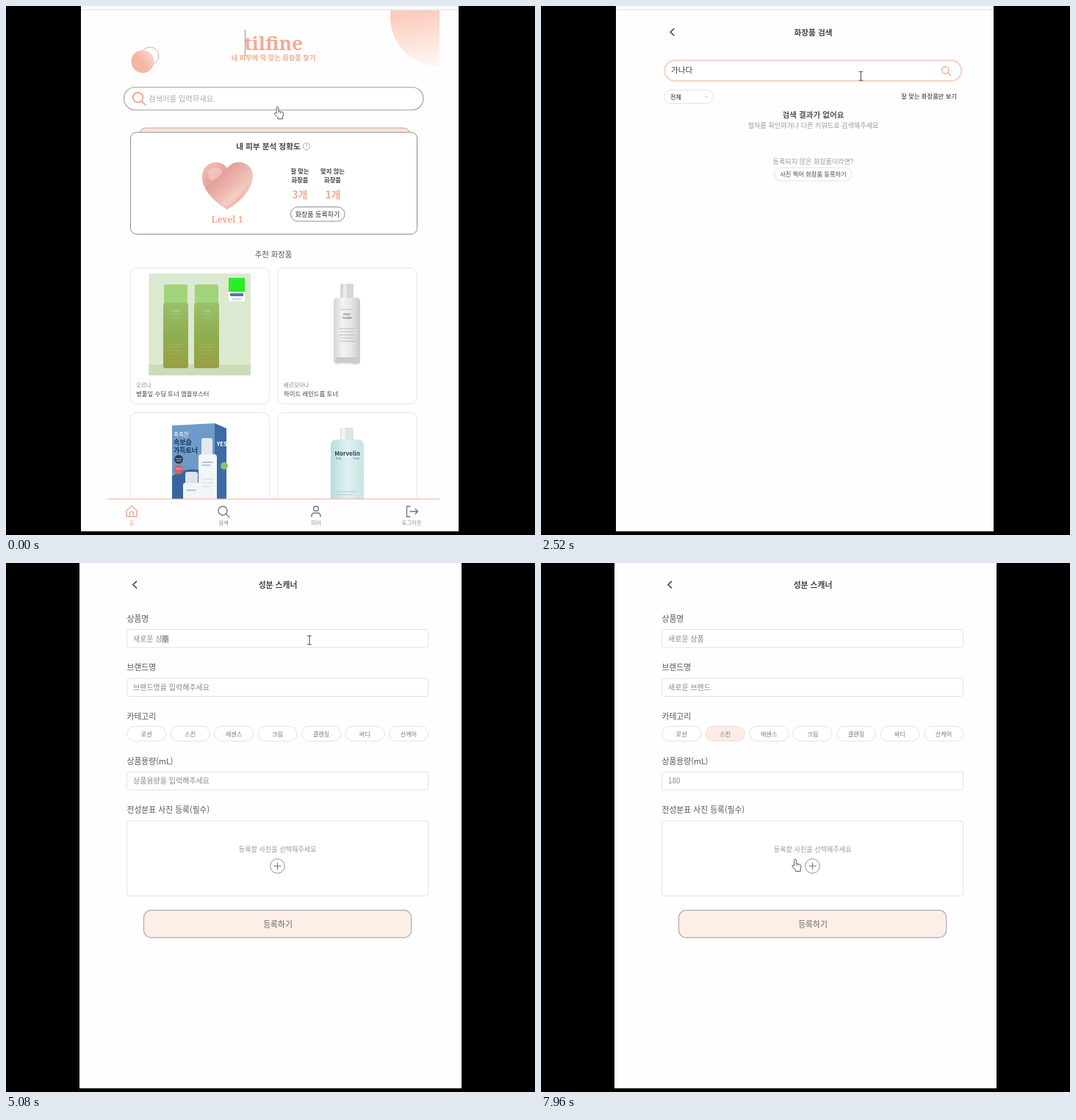
Write an HTML page that moves like this. It is 720 by 720 pixels and loops after 8000 ms.

```html
<!DOCTYPE html>
<html lang="ko">
<head>
<meta charset="utf-8">
<title>Cosmetics search</title>
<style>
html, body { margin: 0; width: 100%; height: 100%; overflow: hidden; background: #000; }
svg { display: block; width: 100vw; height: 100vh; }
text { font-family: "Noto Sans CJK KR", "Noto Sans CJK", "Noto Sans", sans-serif; white-space: pre; }
.serif { font-family: "Noto Serif", "Liberation Serif", serif; font-weight: 900; }
</style>
</head>
<body>
<svg id="stage" viewBox="0 0 720 720"></svg>
<script>
const LOOP = 8000;
const SALMON = '#f3aa94';
const SOFT = '#f6d2c6';

// y is the visual middle of the line
function text(x, y, size, str, fill = '#555', opt = {}) {
  const { anchor = 'start', weight = 400, id = '', cls = '' } = opt;
  return `<text x="${x}" y="${(y + size * 0.37).toFixed(2)}" font-size="${size}" fill="${fill}" ` +
    `text-anchor="${anchor}" font-weight="${weight}"${id && ` id="${id}"`}${cls && ` class="${cls}"`}>${str}</text>`;
}
const mid = (x, y, size, str, fill, weight = 400, cls = '') =>
  text(x, y, size, str, fill, { anchor: 'middle', weight, cls });
const box = (x, y, w, h, r, fill, stroke = 'none', sw = 1, id = '') =>
  `<rect x="${x}" y="${y}" width="${w}" height="${h}" rx="${r}" fill="${fill}" stroke="${stroke}" stroke-width="${sw}"${id && ` id="${id}"`}/>`;
const line = (d, stroke, sw = 1, id = '') =>
  `<path d="${d}" fill="none" stroke="${stroke}" stroke-width="${sw}" stroke-linecap="round" stroke-linejoin="round"${id && ` id="${id}"`}/>`;
const circle = (x, y, r, fill, stroke = 'none', sw = 1) =>
  `<circle cx="${x}" cy="${y}" r="${r}" fill="${fill}" stroke="${stroke}" stroke-width="${sw}"/>`;
const lens = (x, y, r, color, sw) =>
  circle(x, y, r, 'none', color, sw) + line(`M${x + r * 0.72} ${y + r * 0.72}l${r * 0.8} ${r * 0.8}`, color, sw);
const back = (x, y) => line(`M${x + 2.3} ${y - 4.3}l-4.8 4.3 4.8 4.3`, '#444', 1.6);
const group = (id, body, attrs = '') => `<g id="${id}" ${attrs}>${body}</g>`;

const gradient = (id, x2, y2, ...stops) =>
  `<linearGradient id="${id}" x1="0" y1="0" x2="${x2}" y2="${y2}">` +
  stops.map((c, i) => `<stop offset="${i / (stops.length - 1)}" stop-color="${c}"/>`).join('') + '</linearGradient>';

const defs = `<defs>
  ${gradient('sun', 0.15, 1, '#f8c3b1', '#fbcdbe', '#fef5f1')}
  ${gradient('dot', 0.8, -0.6, '#f5b5a2', '#f9cfc2', '#fffaf8')}
  ${gradient('heart', 1, 1, '#f1c3bb', '#e5a19b', '#f3c8bd', '#d99089')}
  ${gradient('leaf', 0, 1, '#9bc06b', '#8fae50', '#9a9f42')}
  ${gradient('glass', 1, 0, '#d3d5d6', '#f3f4f4', '#e4e6e7', '#c6c9ca')}
  ${gradient('aqua', 1, 0, '#b9dcdf', '#dff2f1', '#c6e5e6')}
  <clipPath id="page"><rect x="139" y="6" width="451" height="665"/></clipPath>
</defs>`;

function greenSet() {
  const bottle = x => box(x, 379, 32, 29, 3, '#a1d47b') + box(x - 1, 404, 34, 89, 3, 'url(#leaf)') +
    mid(x + 16, 415, 5, 'ONA', '#c9dca2') + line(`M${x + 8} 420h16M${x + 11} 424h10`, '#bccf90', 0.6) +
    line(`M${x + 6} 461h20M${x + 6} 465h18M${x + 6} 469h20M${x + 6} 473h14`, '#b0bd74', 0.6);
  return box(194.5, 364, 138.5, 138.5, 0, '#dce9d0') + box(194.5, 488, 138.5, 14.5, 0, '#cbdcb8') +
    bottle(215) + bottle(257) + box(303, 370, 22, 19, 1, '#29ee25') + box(303, 389, 22, 13, 0, '#fff') +
    box(305, 391, 18, 4, 0, '#4a78b8') + line('M308 399h12', '#8aa5cc', 1);
}

function clearBottle() {
  let rows = '';
  for (let i = 0; i < 5; i++) rows += `M${454 + i % 2 * 2} ${439 + i * 4.3}h${20 - i % 2 * 4}`;
  return box(455, 378, 18, 22, 2, '#d4d6d8') + box(459, 378, 5, 22, 1, '#e9eaeb') +
    box(446, 397, 36, 91, 5, 'url(#glass)') + box(449, 478, 30, 8, 3, '#c9cbcc') +
    line('M456 413h16', '#aaa', 0.8) + mid(464, 420, 4, 'MILD', '#777', 700) +
    mid(464, 425, 4, 'TONER', '#777', 700) + line(rows, '#aaa', 0.8);
}

function blueSet() {
  return '<path d="M226 571l58-3 16 7v97h-74z" fill="#6f9bc8"/><path d="M284 568l16 7v97h-16z" fill="#3d6aa6"/>' +
    '<path d="M226 640q30-20 58 2v30h-58z" fill="#38649d"/>' +
    text(228, 583, 7.5, '촉촉한', '#fff') + text(228, 594, 9, '속보습', '#16345f', { weight: 700 }) +
    text(228, 605, 9, '가득토너', '#16345f', { weight: 700 }) +
    circle(235, 617, 6, '#233a5e') + circle(235, 631, 6.5, '#c7646c') +
    line('M231 616h8M232 619h6M231 630h8', '#e6dfe6', 0.8) +
    text(287, 596, 7.5, 'YES!', '#fff', { weight: 700 }) + circle(297, 626, 5, '#8cc26a') +
    box(266, 588, 15, 25, 3, '#e3e8ee') + box(262, 610, 25, 64, 4, '#f3f6f9') +
    line('M267 621h14M267 625h11', '#7293bd', 1.2) + line('M267 644h15M267 649h15M267 654h11', '#b9c7d8', 0.7) +
    box(244, 634, 17, 20, 3, '#dce5ee') + box(241, 649, 23, 25, 3, '#f2f5f8') + line('M246 659h12', '#7293bd', 1);
}

function aquaBottle() {
  return box(455, 574, 18, 18, 2, '#dce6e8') + box(457, 574, 5, 18, 1, '#eef4f5') +
    '<path d="M442 680v-82q0-8 9-8h27q9 0 9 8v82z" fill="url(#aqua)"/>' +
    mid(464.5, 609, 8, 'Morvelin', '#29434a', 700) +
    text(449, 616, 3.5, 'Daily', '#496168') + text(472, 616, 3.5, 'Toner', '#496168') +
    line('M450 661h28M450 665h22', '#9bc1c5', 0.7);
}

function home() {
  const card = (x, y) => box(x, y, 189, 185, 8, '#fff', '#e6e6e6');
  const label = (x, brand, name) => text(x, 516, 7.5, brand, '#888') + text(x, 527.5, 8.4, name, '#444');
  const tab = (x, name, color) => mid(x, 703, 7.4, name, color);
  const page =
    circle(590, 15, 67, 'url(#sun)') + circle(196, 68, 12, 'none', '#a9a3a3', 0.8) + circle(186, 75.5, 15.5, 'url(#dot)') +
    mid(364, 50.5, 26, 'tilfine', SALMON, 900, 'serif') + line('M325.5 33v35', '#777', 0.8) +
    mid(364, 71, 9.2, '내 피부에 딱 맞는 화장품 찾기', SALMON, 700) +
    box(160.5, 110.5, 407.5, 31, 15.5, '#fff', '#aaa2a1', 1.2) + lens(179.5, 124.5, 6.8, SALMON, 2) +
    text(194, 126, 10.3, '검색어를 입력하세요.', '#aaa') +
    box(181, 166, 369, 30, 9, '#fde4db', '#aaa') + box(169.5, 172, 390, 138.5, 8, '#fff', '#8d8d8d') +
    mid(357, 191, 10.7, '내 피부 분석 정확도', '#444', 700) +
    circle(409, 191, 4.7, 'none', '#999', 0.8) + mid(409, 191, 6.5, '?', '#888') +
    '<path d="M301 277C286 269 266 250 267 231C268 211 293 207 301 221C311 206 335 212 336 231C336 250 316 269 301 277Z" fill="url(#heart)"/>' +
    '<path d="M274 227q8-13 21-3-4 10-16 14z" fill="#fbe0d8" opacity=".45"/><path d="M292 268q12-11 32-20-10 16-23 25z" fill="#f7d3c9" opacity=".4"/>' +
    mid(301, 290.5, 12, 'Level 1', SALMON, 900, 'serif') +
    mid(400, 225, 8.3, '잘 맞는', '#444', 700) + mid(400, 237, 8.3, '화장품', '#444', 700) +
    mid(444.5, 225, 8.3, '맞지 않는', '#444', 700) + mid(444.5, 237, 8.3, '화장품', '#444', 700) +
    mid(400, 257, 13.8, '3개', SALMON, 700) + mid(445, 257, 13.8, '1개', SALMON, 700) +
    box(387.5, 273.5, 73.5, 19.5, 9.7, '#fff', '#8d8d8d') + mid(424, 283.5, 9, '화장품 등록하기', '#333', 500) +
    mid(364, 338, 10.4, '추천 화장품', '#555', 500) +
    card(169.5, 356.5) + card(370, 356.5) + card(169.5, 553.5) + card(370, 553.5) +
    greenSet() + clearBottle() + blueSet() + aquaBottle() +
    label(177, '오르나', '병풀잎 수딩 토너 앰플부스터') + label(378, '베르모아나', '하이드 레인드롭 토너');
  const nav = line('M139 671h451', SALMON, 1.2) +
    line('M164 686.5l7-6 7 6v8.5h-14zM168.5 695v-5.5q2.5-3 5 0v5.5', SALMON, 1.5) +
    lens(295, 687, 6, '#777', 1.4) + circle(422, 684, 3.3, 'none', '#777', 1.4) +
    line('M416 695v-1q0-4 4-4h4q4 0 4 4v1', '#777', 1.4) +
    line('M550 681h-4.5v14h4.5M550 688h10M557 684.5l3.5 3.5-3.5 3.5', '#777', 1.4) +
    tab(171, '홈', SALMON) + tab(296, '검색', '#888') + tab(422, '마이', '#888') + tab(552, '로그아웃', '#888');
  return `<g clip-path="url(#page)">${page}</g>` + nav;
}

function search() {
  return back(178.5, 35.5) + mid(370.5, 36, 10.7, '화장품 검색', '#444', 700) +
    box(168.3, 74, 404, 28, 14, '#fff', SOFT, 2) + group('lens', lens(550.3, 87.3, 4.8, '#f3c0b0', 1.8)) +
    text(177, 87.5, 10.6, '', '#888', { id: 'query' }) +
    group('pill', box(168, 114.5, 67, 18, 9, '#fff', '#e3e3e3') + line('M223 122.7l2 1.8 2-1.8', '#bbb', 0.8)) +
    text(176, 123.7, 8.1, '전체', '#222') +
    text(566, 123, 8.3, '잘 맞는 화장품만 보기', '#222', { anchor: 'end' }) +
    group('empty',
      mid(370.5, 148, 10.6, '검색 결과가 없어요', '#555', 700) +
      mid(370.5, 163, 9.1, '철자를 확인하거나 다른 키워드로 검색해주세요', '#999', 500) +
      mid(370.5, 212, 9.1, '등록되지 않은 화장품이라면?', '#999', 500) +
      box(318, 220, 105, 18, 9, '#fff', '#e1e1e1') + mid(370.5, 229, 8.25, '사진 찍어 화장품 등록하기', '#444', 500));
}

function form() {
  const label = (y, str) => text(164.5, y, 10.8, str, '#555', { weight: 500 });
  const field = (y, h, id) => box(164.7, y, 410, h, 3, '#fff', '#e2e2e2') +
    (id ? text(173, y + h / 2 + 0.2, 10, '', '#888', { id }) : '');
  const chips = ['로션', '스킨', '에센스', '크림', '클렌징', '바디', '선케어'].map((name, i) =>
    box(164.7 + i * 59.45, 222.3, 53.2, 20, 10, '#fff', '#e2e2e2', 1, 'chip' + i) +
    mid(191.3 + i * 59.45, 232.5, 8.1, name, '#777')).join('');
  return back(175.3, 29.5) + mid(370, 30, 10.8, '성분 스캐너', '#444', 700) +
    label(76, '상품명') + field(90.5, 24.5, 'product') +
    label(142, '브랜드명') + field(157, 24.5, 'brand') +
    label(209, '카테고리') + chips +
    label(269.7, '상품용량(mL)') + field(284.3, 24.5, 'volume') +
    label(336, '전성분표 사진 등록(필수)') + field(351, 102) +
    mid(369.7, 390, 9.15, '등록할 사진을 선택해주세요', '#999') +
    circle(369.5, 412.5, 9.8, '#fff', '#8d8d8d') + line('M365 412.5h9M369.5 408v9', '#777', 1.1) +
    box(187.5, 472.6, 364.2, 37.2, 10, '#fdeee8', '#b3aaa8', 1.2) + mid(370, 491.5, 10.8, '등록하기', '#666', 500);
}

const cursors =
  group('arrow', '<path d="M0 0V12.6L3 10 5 14.3 7 13.4 5.1 9.2H9Z" fill="#fff" stroke="#555" stroke-width=".9" stroke-linejoin="round"/>') +
  group('hand', '<path d="M-1.4 9V1.6a1.4 1.4 0 0 1 2.8 0V6.2L6.6 7.4q1.6.5 1.4 2.2L7.2 13.5V16.6H.4V14.8L-4 10.2q-.5-1.7 1.1-1.6Z" fill="#fff" stroke="#555" stroke-linejoin="round"/><path d="M1.4 6.5V9M4 7.2V9.5" stroke="#777" stroke-width=".8"/>') +
  group('beam', line('M-2.5 -6h2l.5.6.5-.6h2M0-5.4V5.4M-2.5 6h2l.5-.6.5.6h2', '#555', 1.1));

const stage = document.getElementById('stage');
stage.innerHTML = defs + box(0, 0, 720, 720, 0, '#000') + box(102, 0, 514, 715, 0, '#fefefe', 'none', 0, 'sheet') +
  group('strip', box(102, 0, 514, 5, 0, '#fafafa') + line('M102.5 5.3h513', '#e2e2e2')) +
  group('home', home()) + group('search', search()) + group('form', form()) +
  box(0, 0, 9.5, 11, 0, '#777', 'none', 0, 'compose') +
  line('', '#666', 0.9, 'titleCaret') + line('', '#666', 0.9, 'caret') + cursors;

const el = id => document.getElementById(id);
const show = (id, on) => el(id).setAttribute('display', on ? 'inline' : 'none');
const put = (id, str) => { if (el(id).textContent !== str) el(id).textContent = str; };
const within = (t, a, b) => t >= a && t < b;
const ramp = (t, a, b) => Math.min(1, Math.max(0, (t - a) / (b - a)));

// Hangul input, one entry per key press
const fresh = ['ㅅ', '새', '샐', '새로', '새롱', '새로우', '새로운', '새로운 '];
const compose = list => fresh.concat(list.map(s => '새로운 ' + s));
const productKeys = compose(['ㅅ', '사', '상', '상ㅍ', '상푸', '상품']);
const brandKeys = compose(['ㅂ', '브', '블', '브래', '브랜', '브랜ㄷ', '브랜드']);
const queryKeys = ['ㄱ', '가', '간', '가나', '가낟', '가나다'];

function typed(t, start, step, keys, hint) {
  return t < start ? hint : keys[Math.min(keys.length - 1, Math.floor((t - start) / step))];
}

// time, x, y of the pointer's hot spot
const path = [
  [40, 366, 128], [1120, 366, 128], [1400, 436, 103], [1680, 436, 103], [1800, 436, 89], [2480, 436, 89],
  [2600, 434, 112], [2760, 434, 112], [2880, 420, 262], [3040, 420, 262], [3120, 400, 264], [3280, 400, 264],
  [3360, 346, 231], [4120, 346, 231], [4280, 413, 105], [6680, 413, 105], [6840, 254, 229], [7000, 254, 229],
  [7160, 262, 296], [7400, 262, 296], [7660, 346, 403]
];
function pointer(t) {
  if (t < 40) return [369.5, 137];
  const i = path.findIndex(p => p[0] > t);
  if (i < 0) return path[path.length - 1].slice(1);
  const [a, b] = [path[i - 1], path[i]];
  const k = ramp(t, a[0], b[0]);
  const e = k * k * (3 - 2 * k);
  return [a[1] + (b[1] - a[1]) * e, a[2] + (b[2] - a[2]) * e];
}
function pointerKind(t) {
  if (t < 40 || within(t, 6800, 7080) || t >= 7920) return 'hand';
  if (within(t, 1740, 2560) || within(t, 4240, 6720) || within(t, 7120, 7480)) return 'beam';
  return 'arrow';
}

// x and top of the text caret, or null
function caretAt(t) {
  if (within(t, 2240, 2480) || within(t, 2760, 3040) || within(t, 3280, 3560)) return [207, 83];
  if (within(t, 5320, 5480)) return [173.5, 165];
  if (within(t, 5970, 6160) || within(t, 6320, 6520)) return [230.5, 165];
  if (within(t, 7160, 7360)) return [173.5, 292];
  if (within(t, 7640, 7920)) return [189, 292];
  return null;
}

function render(t) {
  const formOn = t >= 3640, cut = t >= 4120;
  show('home', t < 40);
  show('search', within(t, 40, 3640));
  show('form', formOn);
  show('strip', !cut);
  el('sheet').setAttribute('x', cut ? 100 : 102);
  el('sheet').setAttribute('width', cut ? 520 : 514);
  const k = 514 / 520;
  el('form').setAttribute('transform', cut ? '' : `translate(${102 - 100 * k} ${36 - 30 * k}) scale(${k})`);

  put('query', typed(t, 1840, 80, queryKeys, '검색어를 입력하세요.'));
  el('query').setAttribute('fill', t < 1840 ? '#888' : '#333');
  el('pill').setAttribute('opacity', ramp(t, 80, 160));
  el('lens').setAttribute('opacity', 0.5 + 0.5 * ramp(t, 400, 520));
  el('empty').setAttribute('opacity', t < 2240 ? 0 : t < 2280 ? 0.6 : 1);

  put('product', typed(t, 4600, 40, productKeys, '상품명을 입력해주세요'));
  put('brand', typed(t, 5480, 35, brandKeys, '브랜드명을 입력해주세요'));
  put('volume', typed(t, 7360, 130, ['1', '18', '180'], '상품용량을 입력해주세요'));
  el('chip1').setAttribute('fill', t >= 6840 ? '#fdebe4' : '#fff');

  // block shown behind the syllable being composed
  const first = within(t, 4600, 5160), second = within(t, 5480, 5970);
  const word = el(first ? 'product' : 'brand').textContent;
  show('compose', (first || second) && !word.endsWith(' '));
  const before = word.slice(0, -1);
  const spaces = before.split(' ').length - 1;
  el('compose').setAttribute('x', 173 + (before.length - spaces) * 9.2 + spaces * 2.24);
  el('compose').setAttribute('y', first ? 98 : 164.5);
  el('compose').setAttribute('opacity', 0.4);

  show('titleCaret', within(t, 40, 720) || within(t, 3640, 3880));
  el('titleCaret').setAttribute('d', 'M345.3 28.5v15');
  const caret = caretAt(t);
  show('caret', caret);
  if (caret) el('caret').setAttribute('d', `M${caret[0]} ${caret[1]}v11`);

  const [x, y] = pointer(t), kind = pointerKind(t);
  for (const id of ['arrow', 'hand', 'beam']) {
    show(id, id === kind);
    el(id).setAttribute('transform', `translate(${x.toFixed(2)} ${y.toFixed(2)})`);
  }
}

const start = performance.now();
function tick() {
  render((performance.now() - start) % LOOP);
  requestAnimationFrame(tick);
}
tick();
</script>
</body>
</html>
```
